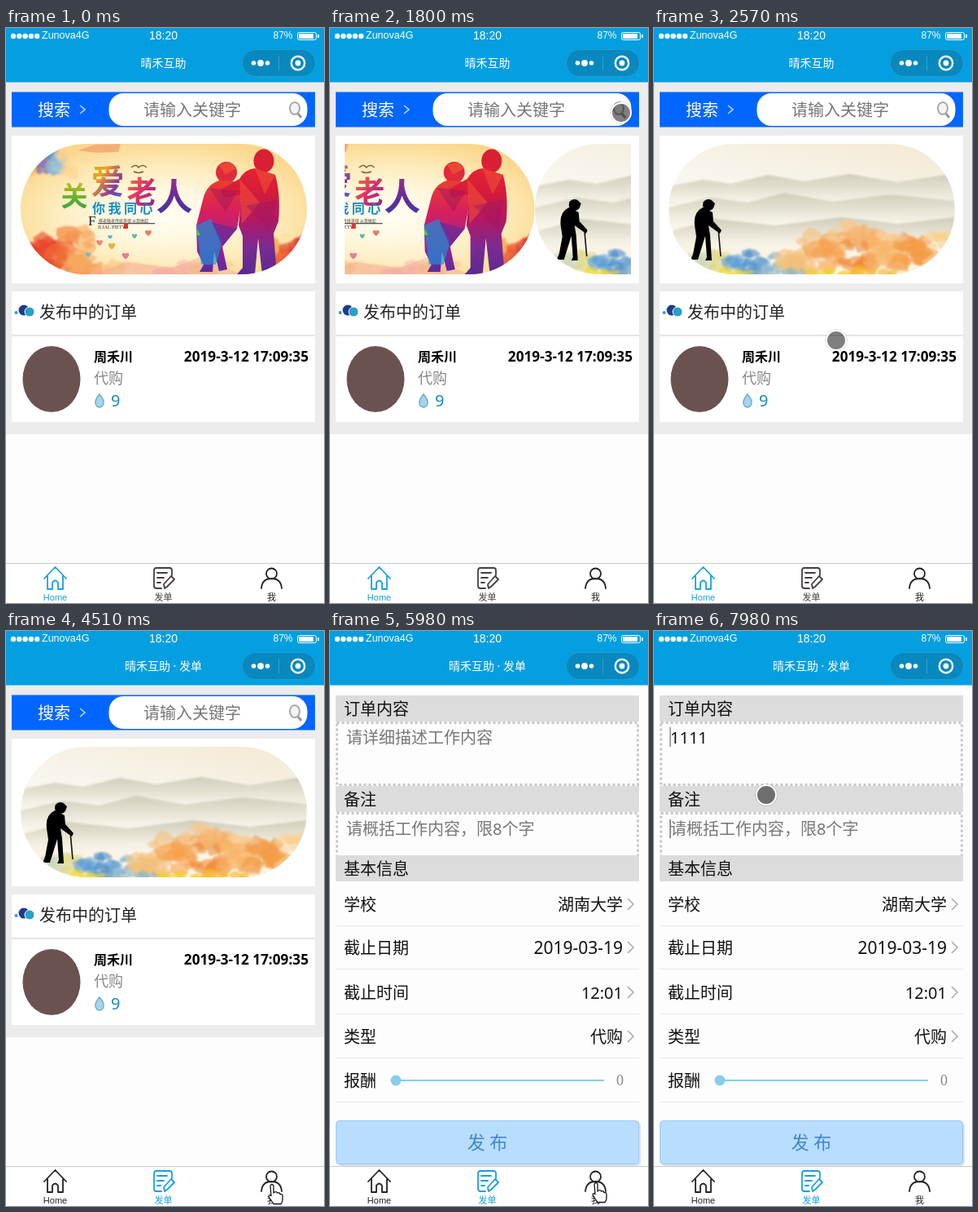
An HTML page that plays this animation: 391 by 705 pixels, repeating every 8 s.

```html
<!DOCTYPE html>
<html lang="zh">
<head>
<meta charset="utf-8">
<style>
html, body { margin: 0; width: 100%; height: 100%; overflow: hidden; background: #fdfdfd; }
svg { display: block; width: 391px; height: 705px; }
text { font-family: 'Noto Sans', 'Noto Sans CJK SC', 'Noto Sans CJK', sans-serif; white-space: pre; }
.ui { font-family: 'Liberation Sans', 'Noto Sans CJK SC', sans-serif; }
.serif { font-family: 'Liberation Serif', serif; }
</style>
</head>
<body>
<svg id="stage" viewBox="0 0 391 705" xmlns="http://www.w3.org/2000/svg"></svg>
<script>
const DURATION = 8000;
const SLIDE = 352;

const rect = (x, y, w, h, fill, extra = '') =>
  `<rect x="${x}" y="${y}" width="${w}" height="${h}" fill="${fill}" ${extra}/>`;
const circle = (x, y, r, fill, extra = '') =>
  `<circle cx="${x}" cy="${y}" r="${r}" fill="${fill}" ${extra}/>`;
const path = (d, fill, extra = '') => `<path d="${d}" fill="${fill}" ${extra}/>`;
const line = (d, color, width = 1, extra = '') =>
  path(d, 'none', `stroke="${color}" stroke-width="${width}" ${extra}`);
const text = (x, y, size, fill, str, extra = '') =>
  `<text x="${x}" y="${y}" font-size="${size}" fill="${fill}" ${extra}>${str}</text>`;
const MID = 'text-anchor="middle"', END = 'text-anchor="end"';
const BOLD = 'font-weight="700"', MEDIUM = 'font-weight="500"';
const gradient = (id, colors, extra = 'x2="0" y2="1"', kind = 'linear') =>
  `<${kind}Gradient id="${id}" ${extra}>` + colors.map((c, i) =>
    `<stop offset="${i / (colors.length - 1)}" stop-color="${c}"/>`).join('') + `</${kind}Gradient>`;

function random(seed) {
  return () => (seed = (seed * 16807) % 2147483647) / 2147483647;
}

// Jagged paint spots scattered in a box, coloured from left to right.
function wash(seed, count, [x, y, w, h], colors, size) {
  const rnd = random(seed);
  let out = '';
  for (let i = 0; i < count; i++) {
    const u = (i + rnd()) / count;
    const color = colors[Math.floor(u * colors.length)];
    const cx = x + u * w, cy = y + rnd() * h, r = size * (0.5 + rnd());
    let d = '';
    for (let k = 0; k < 7; k++) {
      const a = k / 7 * Math.PI * 2, reach = r * (0.6 + 0.7 * rnd());
      d += `${k ? 'L' : 'M'}${(cx + 1.4 * reach * Math.cos(a)).toFixed(1)} ${(cy + reach * Math.sin(a)).toFixed(1)}`;
    }
    out += path(d + 'z', color, 'opacity=".6"');
  }
  return `<g filter="url(#soft)">${out}</g>`;
}

function heart(x, y, s, color) {
  return path('M0 4C-7-1-3-5 0-2C3-5 7-1 0 4z', color, `transform="translate(${x} ${y}) scale(${s})"`);
}

function familySlide() {
  const title = (x, y, size, fill, str) => text(x, y, size, fill, str, `font-weight="900" ${MID}`);
  return rect(18, 142, 352, 160, 'url(#cream)')
    + wash(7, 22, [30, 150, 50, 30], ['#f9b75c', '#7d6db8', '#4a8fd0', '#8fc0de', '#fbd490'], 6)
    + path('M88 150L110 143L141 142L138 152L112 153z', '#f2a06c', 'opacity=".75"')
    + wash(11, 34, [80, 290, 190, 16], ['#f08a4e', '#f9c48a', '#fbd9ae', '#f5b9b0', '#f6c58e'], 8)
    + wash(5, 38, [18, 250, 88, 50], ['#e23a28', '#e8442c', '#ee6a35', '#f7a860'], 9)
    + wash(31, 26, [325, 262, 45, 40], ['#f4a54c', '#ea5a35', '#de3a2c'], 9)
    + path('M105 302L150 287L205 294L238 281L290 302z', '#f2a08c', 'opacity=".4"')
    + title(84, 218, 33, 'url(#leaf)', '关') + title(125, 203, 41, 'url(#rainbow)', '爱')
    + title(167, 215, 37, 'url(#sunset)', '老') + title(207, 224, 45, 'url(#violet)', '人')
    + text(106, 227, 16, '#148cc8', '你我同心', 'font-weight="900" letter-spacing="3.500"')
    + text(101, 242, 17, '#222', 'F', 'class="serif"')
    + text(114, 238, 5, '#444', '尊老敬老传统美德') + text(155, 238, 5, '#444', '从我做起')
    + rect(113, 239, 70, 1.3, '#555')
    + text(113, 246, 6, '#333', 'ILIAL PIETY', 'class="serif"') + rect(145, 239, 5, 7, '#d8352b')
    + line('M154 171q6-5 9 0q5-5 10 0M157 176q6 3 12 0', '#8b5a3c', 1.5)
    + heart(115, 263, 1, '#e9877d') + heart(130, 267, 1.1, '#e5b04a') + heart(147, 279, 1.1, '#e47c9c')
    + heart(128, 256, .7, '#5eb5ce') + heart(158, 255, .8, '#68b6a0') + heart(175, 251, 1, '#e6805a')
    + heart(101, 278, .8, '#6dbad0')
    + circle(271, 177, 13, '#e02a3c') + path('M262 168L275 164L283 172L270 180z', '#f0552f', 'opacity=".7"')
    + path('M262 187Q246 192 242 211L234 242L235 274L243 290L238 299H254L256 274L262 298L272 296L266 268L284 246L292 202L281 188z', 'url(#woman)')
    + `<ellipse cx="317" cy="163" rx="12.500" ry="14.500" fill="#d91f35"/>`
    + path('M306 172Q294 173 287 185L264 198L268 208L290 204L286 242L291 255L291 294L284 302H306L310 258L315 302H333L329 252L335 237Q338 204 331 180z', 'url(#man)')
    + path('M287 185L312 214L290 240zM306 172L331 180L318 204z', '#f4503a', 'opacity=".55"')
    + path('M295 218L333 210L325 248zM250 196L285 200L270 226z', '#a3165e', 'opacity=".5"')
    + path('M234 242L252 234L266 262L258 290H240z', '#1b8fd6', 'opacity=".7"')
    + path('M253 238L284 246L266 268z', '#5a2a9a', 'opacity=".6"')
    + path('M235 246l4 8h-5z', '#62c63c');
}

function elderSlide() {
  return rect(18, 142, 352, 160, 'url(#sky)')
    + '<g filter="url(#soft)">'
    + path('M18 194L60 186L95 191L140 180L185 188L240 179L300 189L370 178V225H18z', 'url(#ridge)')
    + path('M18 220L70 208L115 214L160 202L220 213L290 204L370 212V250H18z', 'url(#ridge)')
    + path('M18 250L75 234L150 242L230 232L300 240L370 232V275H18z', 'url(#ridge)') + '</g>'
    + wash(41, 45, [50, 276, 125, 24], ['#cfd9bc', '#dcd888', '#5a9fd6', '#4289cc', '#86b6d4', '#d8cf9a'], 6)
    + wash(13, 75, [165, 254, 205, 42], ['#f3c07c', '#f6a14e', '#f08a38', '#f8b568', '#f49b45', '#fad08d'], 9)
    + wash(29, 16, [225, 240, 70, 18], ['#f8c890', '#f6b068', '#f8d0a0'], 7)
    + wash(19, 40, [60, 298, 310, 6], ['#f3dc3e', '#8eb6c0', '#f2cf2a', '#f6b62a', '#f5e22a'], 5)
    + '<ellipse cx="67" cy="217" rx="7" ry="7" fill="#000"/>'
    + path('M60 214Q66 207 75 215L74 218z', '#000')
    + path('M60 220Q48 226 50 242L52 256L48 277L45 284H54L59 268L63 255L65 281L63 285H71L69 254L67 242L81 252L83 248L73 237L72 226z', '#000')
    + line('M79 246L82 280', '#111', 1.6);
}

const HOUSE = 'M47 675L60.500 661L74 675M51 672V688H57V680Q60.500 675 64 680V688H70V672';
const NOTE = 'M204 671V665Q204 662 201 662H185Q182 662 182 665V684Q182 687 185 687H191M186 668H198M186 674H194M186 680H190M195 687L194 682L203 672L207 676L198 685z';
const PERSON = 'M314 687Q315 675 326.500 675T339 687M333 669a6.500 6.500 0 1 1-13 0a6.500 6.500 0 1 1 13 0';

function tab(id, d, x, label) {
  return `<g id="${id}">${line(d, 'currentColor', 1.8, 'stroke-linejoin="round" stroke-linecap="round"')}`
    + text(x, 702, 11, 'currentColor', label, `class="ui" ${MID}`) + '</g>';
}

function header() {
  let dots = '';
  for (let i = 0; i < 5; i++) dots += circle(9 + i * 7.3, 10, 3.2, '#fff');
  return rect(0, 0, 391, 66.5, '#039fe0') + dots
    + text(44, 13, 12.5, '#fff', 'Zunova4G', 'class="ui"')
    + text(193.5, 14, 14, '#fff', '18:20', `class="ui" ${MID}`)
    + text(352.5, 13, 12, '#fff', '87%', `class="ui" ${END}`)
    + rect(358.5, 5.5, 23, 9, 'none', 'rx="2" stroke="#fff"') + rect(360, 7, 18, 6, '#fff') + rect(383, 8, 2, 4, '#fff')
    + text(193.5, 48, 14, '#fff', '', `id="title" ${MID} ${MEDIUM}`)
    + rect(290.5, 26.5, 90, 33, '#0788bf', 'rx="16.5" stroke="#2a9ccd"')
    + circle(304.5, 43, 2.8, '#fff') + circle(313, 43, 3.9, '#fff') + circle(321.5, 43, 2.8, '#fff')
    + line('M335.500 34V52', '#3a9fcb')
    + circle(359, 43, 8.2, 'none', 'stroke="#fff" stroke-width="2.4"') + circle(359, 43, 3.4, '#fff');
}

function homePage() {
  return rect(0, 66, 391, 432, '#ececec')
    + rect(7, 78.5, 373, 43, '#0066ff') + text(39, 108, 20, '#fff', '搜索', MEDIUM)
    + line('M91 95L97 100L91 105', '#bcd7ff', 1.6)
    + rect(126.5, 80, 244, 40, '#fff', 'rx="18"') + text(169, 107.5, 20, '#777', '请输入关键字')
    + '<ellipse cx="355" cy="98.500" rx="6" ry="7.500" fill="#f4f4f4" stroke="#aaa" stroke-width="2"/>'
    + line('M359 105L363 110', '#999', 3)
    + rect(7, 132, 373, 181, '#fff')
    + `<g clip-path="url(#window)"><g id="track">
        <g clip-path="url(#pill)" id="family">${familySlide()}</g>
        <g transform="translate(${SLIDE})"><g clip-path="url(#pill)">${elderSlide()}</g></g>
        <use href="#family" x="${SLIDE * 2}"/></g></g>`
    + rect(7, 323, 373, 160, '#fff') + line('M7 377H380', '#ddd', 1.5)
    + circle(12.5, 349, 2, '#2a9fd0') + circle(22, 346, 6.5, '#1f3c88')
    + circle(29, 348, 6, '#2a9fc8', 'stroke="#fff"')
    + text(41, 356, 20, '#222', '发布中的订单')
    + '<ellipse cx="56" cy="430.500" rx="35.500" ry="40.500" fill="#6b5250"/>'
    + text(108, 409, 16, '#000', '周禾川', BOLD)
    + text(372, 408.5, 17.2, '#000', '2019-3-12 17:09:35', `${BOLD} ${END}`)
    + text(108, 436, 18, '#888', '代购')
    + path('M115 449Q121 456 120 460A5 5 0 0 1 110 460Q109 456 115 449z', '#a5d4ea', 'stroke="#6ba9c8" stroke-width="1.300"')
    + text(129, 464, 20, '#1a8bb8', '9');
}

function formPage() {
  const bar = (y, label) => rect(7, y, 373, 32, '#dcdcdc') + text(17, y + 24, 20, '#111', label);
  const box = (y, h) => rect(8.5, y, 370, h, '#fdfdfd', 'stroke="#c8c8c8" stroke-width="3" stroke-dasharray="3"');
  const row = (y, label, value = '', size = 20) => text(17, y, 20, '#111', label)
    + text(360, y, size, '#111', value, END)
    + (value && line(`M366 ${y - 15}L373 ${y - 8}L366 ${y - 1}`, '#aaa', 1.5))
    + line(`M7 ${y + 18.5}H380`, '#e8e8e8');
  return rect(0, 66, 391, 590, '#fdfdfd')
    + box(112.5, 76) + box(223.5, 53)
    + bar(79, '订单内容') + bar(190, '备注') + bar(275, '基本信息')
    + text(20, 138, 20, '#777', '', 'id="content"')
    + text(20, 250, 20, '#777', '请概括工作内容，限8个字')
    + line('M20 118V142', '#777', 1.3, 'id="caretTop"') + line('M20 231V254', '#555', 1.3, 'id="caretBottom"')
    + row(343, '学校', '湖南大学') + row(396, '截止日期', '2019-03-19', 21)
    + row(451, '截止时间', '12:01') + row(505, '类型', '代购') + row(559, '报酬')
    + line('M81 551H337', '#85cdeb', 2) + circle(81, 551, 6.5, '#85cdeb')
    + text(356.5, 557, 18, '#888', '0', `class="serif" ${MID}`)
    + rect(9, 602, 373, 54, '#d3e4f3', 'rx="5"')
    + rect(7.5, 600.5, 372, 53, '#b9ddfe', 'rx="4" stroke="#9cc6ee"')
    + text(193.5, 635, 22, '#3f86d4', '发 布', MID);
}

document.getElementById('stage').innerHTML = `<defs>
  <clipPath id="window">${rect(18, 142, SLIDE, 160, '#fff')}</clipPath>
  <clipPath id="pill">${rect(18, 142, SLIDE, 160, '#fff', 'rx="80"')}</clipPath>
  <filter id="soft"><feGaussianBlur stdDeviation="1.3"/></filter>`
  + gradient('cream', ['#fffdf3', '#fff8e0', '#fdeab8', '#fbd68a'], 'cx=".5" cy=".55" r=".6"', 'radial')
  + gradient('sky', ['#f3e9d2', '#f6f1e4', '#faf8f2', '#fbf3e2'], 'x1="1" y1="0" x2=".5" y2="1"')
  + gradient('ridge', ['#cfcdb9', '#e9e6d8', '#f8f6ee00'])
  + gradient('leaf', ['#dfbf22', '#6bb52d', '#2e9a4a'])
  + gradient('rainbow', ['#8fc31f', '#f0a020', '#8a3a9c', '#2a7bd4'], 'x2="1" y2="1"')
  + gradient('sunset', ['#f08a23', '#d8306c', '#6a2a9c'], 'x2="1" y2="1"')
  + gradient('violet', ['#b02a8a', '#6a2a9a', '#3a3a9a'])
  + gradient('woman', ['#e8402c', '#d81f5c', '#a3248e', '#5a2a9f'])
  + gradient('man', ['#e3242f', '#d31a3c', '#b01866', '#7a2a94', '#5a2a90'])
  + '</defs>' + rect(0, 0, 391, 705, '#fdfdfd')
  + `<g id="home">${homePage()}</g><g id="form">${formPage()}</g>` + header()
  + rect(0, 656, 391, 49, '#fff') + line('M0 656.500H391', '#c8c8c8')
  + tab('tabHome', HOUSE, 60.5, 'Home') + tab('tabOrder', NOTE, 193.5, '发单') + tab('tabMe', PERSON, 326.5, '我')
  + `<g id="touch">${circle(0, 0, 13.5, 'none', 'stroke="#000" stroke-opacity=".15"')}${circle(0, 0, 12, '#000', 'fill-opacity=".5" stroke="#fff" stroke-width="2"')}</g>`
  + path('M-2 1q2-3 4 0v9l1-1q3-1 3.500 1q3-1 3.500 1.500q3-.5 3 2v5q0 3-2 5h-9l-6-9q0-3 3-1z', '#fff',
    'id="hand" stroke="#111" stroke-width="1.300" stroke-linejoin="round"');

const el = {};
document.querySelectorAll('[id]').forEach(node => el[node.id] = node);
const show = (node, on) => node.setAttribute('display', on ? 'inline' : 'none');

// Pointer moves: first time, last time, number of steps, then way points.
const MOVES = [
  [340, 570, 4, [328, 690], [316, 530], [311, 445], [298, 423]],
  [800, 1570, 11, [293, 400], [310, 300], [323, 186], [335, 145], [348, 120], [358, 110]],
  [1640, 1640, 1, [358, 104]],
  [2255, 2410, 3, [330, 150], [295, 215], [255, 280]],
  [2490, 2570, 2, [238, 335], [224, 383]],
  [2650, 3180, 8, [206, 432], [188, 500], [181, 615], [184, 690]],
  [4030, 4340, 5, [192, 690], [240, 692], [300, 690], [328, 690]],
  [4510, 4510, 1, [329, 690]],
  [5980, 6520, 8, [329, 688], [300, 480], [235, 200], [205, 92], [185, 104]],
  [7300, 7520, 4, [170, 125], [137, 152], [136, 200], [138, 218]],
  [7670, 7830, 3, [138, 212], [138, 207], [138, 204]],
  [7980, 7980, 1, [138, 201]]
];

function pointerAt(t) {
  const move = MOVES.filter(m => t >= m[0]).pop();
  if (!move) return null;
  const [start, end, steps, ...points] = move;
  if (steps === 1) return points[0];
  const step = Math.min(steps - 1, Math.floor((t - start) / (end - start) * (steps - 1) + 0.06));
  const at = step / (steps - 1) * (points.length - 1);
  const i = Math.min(points.length - 2, Math.floor(at));
  return points[i].map((v, axis) => v + (points[i + 1][axis] - v) * (at - i));
}

function easeInOut(p) {
  p = Math.max(0, Math.min(1, p));
  return p < 0.5 ? 4 * p ** 3 : 1 - (2 - 2 * p) ** 3 / 2;
}

function update(t) {
  const ordering = t >= 3880, formOpen = t >= 5050;
  show(el.home, !formOpen);
  show(el.form, formOpen);
  el.title.textContent = ordering ? '晴禾互助 · 发单' : '晴禾互助';
  el.tabHome.setAttribute('color', ordering ? '#222' : '#1a9fe0');
  el.tabOrder.setAttribute('color', ordering ? '#1a9fe0' : '#443f42');
  el.tabMe.setAttribute('color', '#222');

  const slide = easeInOut((t - 1582) / 500) + easeInOut((Math.min(t, 4890) - 4765) / 500);
  el.track.setAttribute('transform', `translate(${-SLIDE * slide})`);

  const typed = Math.max(0, Math.min(4, Math.floor((t - 7070) / 76) + 1));
  el.content.textContent = typed ? '1'.repeat(typed) : '请详细描述工作内容';
  el.content.setAttribute('fill', typed ? '#111' : '#777');
  show(el.caretTop, t >= 6520);
  show(el.caretBottom, t >= 7670);

  const pos = pointerAt(t);
  const overTabs = pos && pos[1] > 656;
  show(el.hand, overTabs);
  show(el.touch, pos && !overTabs);
  if (pos) {
    el.hand.setAttribute('transform', `translate(${pos[0] - 2} ${pos[1] - 11})`);
    el.touch.setAttribute('transform', `translate(${pos[0]} ${pos[1]})`);
  }
}

function frame() {
  update(performance.now() % DURATION);
  requestAnimationFrame(frame);
}
frame();
</script>
</body>
</html>
```
